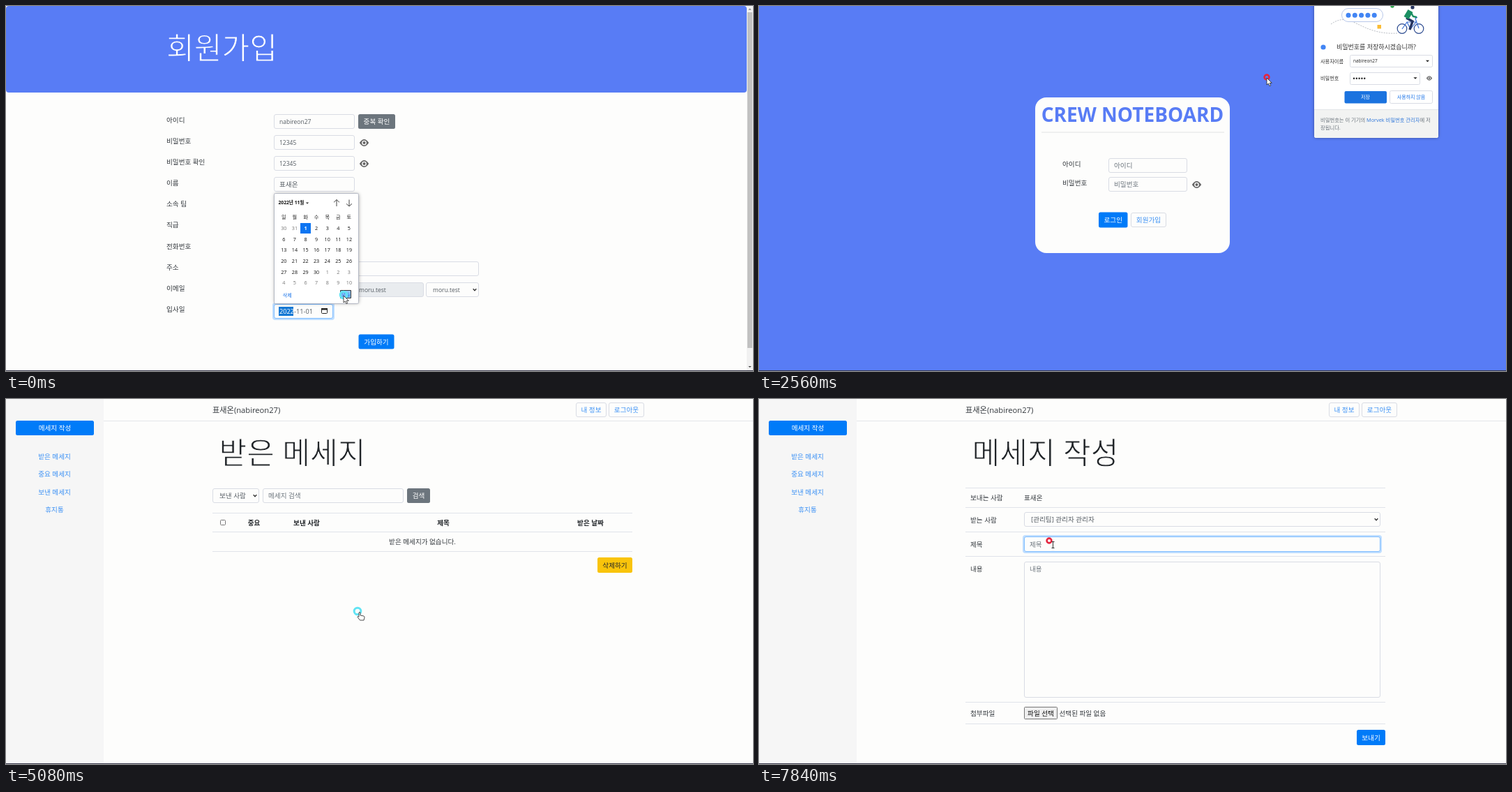
These frames come from a looping animation (1071x523 px, 8 s). An HTML page with a canvas:

```html
<!DOCTYPE html>
<html lang="ko">
<head>
<meta charset="utf-8">
<style>
html, body { margin: 0; width: 100%; height: 100%; overflow: hidden; background: #fdfdfc; }
canvas { display: block; }
</style>
</head>
<body>
<canvas id="stage" width="1071" height="523"></canvas>
<script>
const g = document.getElementById('stage').getContext('2d');
const LOOP = 8000;
const BLUE = '#587cf5', PRIMARY = '#007bf8', HOVER = '#0064cf', LINK = '#3a90f5', GREY = '#6c757d',
      INK = '#33383d', SOFT = '#555c63', PAPER = '#fdfdfc', EDGE = '#d9dce4', CHROME = '#1a73e8';
const USER = 'nabireon27', MAIL = 'nabireon', NAME = '표새온', DOMAIN = 'moru.test';

// ---- helpers ----
// y is the visual middle of the line; returns the end of the text
function text(s, x, y, size = 9.6, color = INK, align = 'left', weight = 400) {
  g.font = `${weight} ${size}px "Open Sans", "Noto Sans CJK KR", sans-serif`;
  g.textAlign = align;
  g.fillStyle = color;
  g.fillText(s, x, y + size * 0.37);
  return x + g.measureText(s).width;
}
// large thin heading: the letter edges are shaved with the background colour
function heading(s, x, y, color, back) {
  text(s, x, y, 43.2, color);
  g.strokeStyle = back;
  g.lineWidth = 1.1;
  g.lineJoin = 'round';
  g.strokeText(s, x, y + 43.2 * 0.37);
  g.lineJoin = 'miter';
}
function rect(x, y, w, h, fill, r = 0) {
  g.beginPath();
  g.roundRect(x, y, w, h, r);
  g.fillStyle = fill;
  g.fill();
}
function box(x, y, w, h, fill = PAPER, edge = EDGE, r = 2.5) {
  rect(x + .5, y + .5, w - 1, h - 1, fill, r);
  g.strokeStyle = edge;
  g.lineWidth = 1;
  g.stroke();
}
function button(s, x, y, w, h, fill = PRIMARY, color = '#fff') {
  rect(x, y, w, h, fill, 2.5);
  text(s, x + w / 2, y + h / 2, 9.6, color, 'center');
}
function ghost(s, x, y, w, h) {
  box(x, y, w, h);
  text(s, x + w / 2, y + h / 2, 9.6, LINK, 'center');
}
function glow(x, y, w, h) {
  rect(x - 2, y - 2, w + 4, h + 4, '#bfdeff', 4);
  box(x, y, w, h, PAPER, '#80bdff');
}
function field(s, x, y, w, size = 9.6, color = SOFT, fill) {
  box(x, y, w, 21, fill);
  text(s, x + 8, y + 10.5, size, color);
}
function line(points, color, width = 1) {
  g.beginPath();
  points.forEach(([x, y]) => g.lineTo(x, y));
  g.strokeStyle = color;
  g.lineWidth = width;
  g.stroke();
}
const rule = (x, y, end, color = '#e0e3ea') => rect(x, y, end - x, 1, color);
function dot(x, y, r, fill) {
  g.beginPath();
  g.arc(x, y, r, 0, 7);
  g.fillStyle = fill;
  g.fill();
}
function ring(x, y, r, color, width) {
  g.beginPath();
  g.arc(x, y, r, 0, 7);
  g.strokeStyle = color;
  g.lineWidth = width;
  g.stroke();
}
const chevron = (x, y) => line([[x - 2.3, y - 1.2], [x, y + 1.2], [x + 2.3, y - 1.2]], '#333', 1.4);
function triangle(x, y, r, dir = 1, color = '#222') {
  g.beginPath();
  g.moveTo(x - r, y - r * dir / 2);
  g.lineTo(x + r, y - r * dir / 2);
  g.lineTo(x, y + r * dir / 2);
  g.fillStyle = color;
  g.fill();
}
function select(s, x, y, w, size) {
  box(x, y, w, 21);
  text(s, x + 10, y + 10.5, size, SOFT);
  chevron(x + w - 6, y + 10.5);
}
function eye(x, y, w = 6.7) {
  g.beginPath();
  g.moveTo(x - w, y);
  g.quadraticCurveTo(x, y - w * 1.5, x + w, y);
  g.quadraticCurveTo(x, y + w * 1.5, x - w, y);
  g.fillStyle = '#666';
  g.fill();
  dot(x, y, w * .5, '#fff');
  dot(x, y, w * .3, '#666');
}

// ---- sign-up page ----
const labels = ['아이디', '비밀번호', '비밀번호 확인', '이름', '소속 팀', '직급', '전화번호', '주소', '이메일', '입사일'];

function signup(t) {
  const row = i => Math.round(155 + 30.15 * i), picking = t < 80, focus = t < 920;
  rect(0, 0, 1062, 124, BLUE, 4);
  heading('회원가입', 230, 60, '#fff', BLUE);
  labels.forEach((s, i) => text(s, 230, 163.3 + 30.12 * i));

  field(USER, 384, row(0), 116, 8.5);
  button('중복 확인', 505, row(0), 53, 21, GREY);
  for (const i of [1, 2]) {
    field('12345', 384, row(i), 116, 8.5);
    eye(513.5, row(i) + 11);
  }
  field(NAME, 384, row(3), 116);
  select('개발팀', 384, row(4), 116);
  select('사원', 384, row(5), 116);
  field('01000000000', 384, row(6), 116, 8.5);
  field('가람특별시 솔내구', 384, row(7), 294);
  field(MAIL, 384, row(8), 101, 8.5);
  text('@', 491.5, row(8) + 11, 8.5, INK, 'center');
  field(DOMAIN, 498, row(8), 101, 8.5, SOFT, '#e9ecef');
  select(DOMAIN, 602, row(8), 76, 8.5);

  if (focus) glow(384, 427, 85, 21);
  else box(384, 427, 85, 21);
  text('2022-11-01', 392, 437.5, 9.2, SOFT);
  if (focus) {
    rect(391, 431, 21, 13, '#1478d4');
    text('2022', 392, 437.5, 9.2, '#fff');
  }
  box(452, 433, 9, 8, '#fff', '#222', 1);
  rect(452, 433, 9, 2.5, '#222');

  if (t >= 960) rect(503.5, 468.5, 55, 25, '#a9d0fb', 4);
  button('가입하기', 505.5, 470.5, 51, 21, t > 620 ? HOVER : PRIMARY);

  rect(1062, 0, 9, 522, '#f1f1f1');
  rect(1063, 9, 7, 481, '#c1c1c1');
  triangle(1066.5, 4.5, 2.2, -1, '#777');
  triangle(1066.5, 517, 2.2, 1, '#444');

  if (picking) calendar();
  if (t >= 1040 && t < 1680) notice(t);
}

function calendar() {
  g.shadowColor = 'rgba(0,0,0,.35)';
  g.shadowBlur = 5;
  rect(385, 269, 121, 157, '#fff', 2);
  g.shadowBlur = 0;
  box(384, 268, 122, 159, '#fff', '#b5b9c4', 2);
  text('2022년 11월', 390.5, 282, 6.7, '#111', 'left', 700);
  triangle(432, 282.5, 2.2);
  for (const [x, d] of [[474, -1], [492, 1]]) {
    line([[x, 277.5], [x, 287]], '#444');
    line([[x - 4, 282.3 + d], [x, 282.3 + 4.7 * d], [x + 4, 282.3 + d]], '#444');
  }
  [...'일월화수목금토'].forEach((s, i) => text(s, 398.3 + 15.6 * i, 302, 7.2, '#222', 'center'));
  rect(422, 311, 15, 15, '#0d75f2');
  for (let i = 0; i < 42; i++) {
    const n = i - 1, inside = n > 0 && n < 31;
    text(n < 1 ? n + 31 : n > 30 ? n - 30 : n, 398.3 + i % 7 * 15.6, 318.5 + (i / 7 | 0) * 15.6, 7.2,
      n === 1 ? '#fff' : inside ? '#111' : '#777', 'center', n === 1 ? 700 : 400);
  }
  text('삭제', 403.3, 414, 7.2, CHROME, 'center');
  box(479, 407, 16, 12, '#8fc6f7', '#333', 0);
  text('오늘', 487, 413, 7.2, CHROME, 'center');
}

function notice(t) {
  g.shadowColor = 'rgba(0,0,0,.45)';
  g.shadowBlur = 5;
  rect(411, -6, 249, 58, '#fff', 3);
  g.shadowBlur = 0;
  text(NAME + '님, 가입을 축하드립니다.', 419, 11, 7.5, '#333');
  rect(614.5, 25, 38, 19, '#1b5fc4', 3);
  rect(615.5, 26, 36, 17, '#fff', 2);
  rect(616.5, 27, 34, 15, t > 1560 ? '#3b86ea' : CHROME, 2);
  text('확인', 633.5, 34.5, 7, '#fff', 'center', 500);
}

// ---- login page ----
function login(t) {
  const filled = t >= 3480;
  rect(0, 0, 1071, 523, BLUE);
  rect(396, 131, 279, 223, PAPER, 16);
  text('CREW NOTEBOARD', 535.5, 156, 28, BLUE, 'center', 700);
  rule(405, 180.5, 667, '#e2e3e6');
  text('아이디', 435, 226.5);
  text('비밀번호', 435, 253.5);
  if (filled) {
    field(USER, 501, 218, 113, 7.2, '#111', '#e8f0fe');
    field('', 501, 245, 113, 8, '#111', '#e8f0fe');
    for (let i = 0; i < 5; i++) dot(510.7 + 2.8 * i, 256.3, 1.15, '#111');
  } else {
    field('아이디', 501, 218, 113, 9.6, GREY);
    field('비밀번호', 501, 245, 113, 9.6, GREY);
  }
  eye(627.5, 256);
  button('로그인', 487, 295.5, 41.5, 22, t > 4440 ? HOVER : PRIMARY);
  ghost('회원가입', 533, 296, 51, 21);
  if (t >= 1960 && t < 3440) savePopup(t);
}

function savePopup(t) {
  g.shadowColor = 'rgba(0,0,0,.4)';
  g.shadowBlur = 4;
  rect(796, -10, 178, 199, '#fff', 3);
  g.shadowBlur = 0;

  g.setLineDash([2, 1.5]);
  g.beginPath();
  g.moveTo(820, 26);
  g.bezierCurveTo(850, 5, 860, 42, 915, 39);
  g.strokeStyle = '#b9bdc4';
  g.lineWidth = 1;
  g.stroke();
  g.setLineDash([]);
  box(835, 3, 60, 20, '#fff', '#b8c8ea', 10);
  for (let i = 0; i < 5; i++) dot(845 + 9.3 * i, 13.3, 3.5, '#4285f4');
  dot(908, 0, 2.7, '#34a853');
  rect(886.5, 27, 5.5, 5.5, '#fbbc34');
  for (const x of [922, 946]) ring(x, 32.5, 6.8, '#2b4a8f', 1.2);
  line([[922, 33], [929, 23], [942, 23], [934, 33], [929, 23]], '#3e72d5', 1.2);
  line([[946, 32], [941, 18], [944, 16]], '#3e72d5', 1.2);
  line([[928, 17], [937, 22], [933, 34]], '#26345f', 3.5);
  line([[928, 17], [934, 7]], '#1b8f62', 8);
  line([[934, 8], [938, 15], [943, 16]], '#1b8f62', 2.5);
  dot(937, 2, 2.6, '#26345f');

  dot(809, 59, 3.6, '#4285f4');
  text('비밀번호를 저장하시겠습니까?', 828, 59, 9, '#333');
  text('사용자이름', 805, 79, 7.2, '#333');
  box(847, 70, 119, 18, '#fff', EDGE, 2);
  text(USER, 852, 79, 6.5, '#222');
  triangle(958.5, 79, 2.6);
  text('비밀번호', 805, 103.5, 7.2, '#333');
  box(847, 95, 101, 18, '#fff', EDGE, 2);
  for (let i = 0; i < 5; i++) dot(853 + 3.8 * i, 103.7, 1.2, '#222');
  triangle(941, 103.5, 2.6);
  eye(961, 103.5, 4.2);
  rect(839.5, 122, 60.5, 17.5, t > 2980 ? '#3b86ea' : '#1b73df', 2);
  text('저장', 869.5, 130.5, 7, '#fff', 'center', 500);
  box(904, 121, 62, 19, '#fff', EDGE, 2);
  text('사용하지 않음', 935, 130.5, 7, CHROME, 'center');

  rect(796, 148, 178, 41, '#f2f3f2', [0, 0, 3, 3]);
  rule(796, 148, 974, '#e3e5e8');
  let x = text('비밀번호는 이 기기의 ', 805, 163, 7.3, GREY);
  x = text('Morvek 비밀번호 관리자', x, 163, 7.3, '#2f76d8');
  text('에 저', x, 163, 7.3, GREY);
  text('장됩니다.', 805, 174, 7.3, GREY);
}

// ---- message pages ----
function shell(title, hover) {
  rect(0, 0, 140, 523, '#f6f6f6');
  button('메세지 작성', 14, 31, 112, 21, hover ? HOVER : PRIMARY);
  ['받은 메세지', '중요 메세지', '보낸 메세지', '휴지통'].forEach((s, i) =>
    text(s, 69.5, 82 + 25.6 * i, 9.6, LINK, 'center'));
  rule(140, 31, 1071, '#e4e6ea');
  text(`${NAME}(${USER})`, 296, 16, 11.2);
  ghost('내 정보', 817, 5, 44, 21);
  ghost('로그아웃', 864, 5, 51, 21);
  heading(title, 305.5, 77, '#212529', PAPER);
}

function inbox(t) {
  shell('받은 메세지', t > 6540);
  select('보낸 사람', 296, 128, 67);
  field('메세지 검색', 368, 128, 202, 9.6, GREY);
  button('검색', 575, 128, 33, 21, GREY);
  for (const y of [163, 190, 218]) rule(296, y, 898);
  box(307, 173, 8, 8, '#fff', '#767676', 1);
  [['중요', 355.5], ['보낸 사람', 431], ['제목', 627], ['받은 날짜', 838]].forEach(([s, x]) =>
    text(s, x, 177, 9.6, '#212529', 'center', 700));
  text('받은 메세지가 없습니다.', 597, 204.5, 9.6, INK, 'center');
  button('삭제하기', 848, 227, 50, 22, '#f9c40b', '#212529');
}

function compose(t) {
  shell('메세지 작성', t < 7180);
  for (const y of [127, 155, 190, 225, 434, 465]) rule(296, y, 898);
  [['보내는 사람', 141.5], ['받는 사람', 173.5], ['제목', 208], ['내용', 243], ['첨부파일', 450]].forEach(([s, y]) =>
    text(s, 303, y));
  text(NAME, 380, 141.5);
  select('[관리팀] 관리자 관리자', 380, 162, 511);
  if (t >= 7680) glow(380, 197, 511, 22);
  else box(380, 197, 511, 22);
  text('제목', 388, 208, 9.6, GREY);
  box(380, 233, 511, 195);
  text('내용', 388, 243, 9.6, GREY);
  box(380, 441, 48, 18, '#efefef', '#767676', 1);
  text('파일 선택', 404, 450, 9.6, '#111', 'center');
  text('선택된 파일 없음', 430.5, 450);
  button('보내기', 857, 474, 41, 22);
}

// ---- pointer ----
const path = [ // time, x, y
  [0, 484, 414], [120, 484, 414], [760, 541, 463], [1280, 541, 463], [1600, 630, 33], [2080, 630, 33],
  [2560, 728, 102], [3040, 866, 128], [3440, 866, 128], [4120, 617, 247], [4560, 504, 304], [5640, 504, 304],
  [5880, 190, 165], [6160, 190, 165], [6320, 158, 149], [6640, 66, 40], [7040, 66, 40], [7600, 416, 203], [8000, 416, 203]
];
const shapes = [[0, 'arrow'], [640, 'hand'], [1300, 'arrow'], [4440, 'hand'], [5400, 'arrow'],
  [6540, 'hand'], [7180, 'arrow'], [7520, 'beam']];
const presses = [[0, 80], [920, 1040], [1600, 1700], [3320, 3440], [4960, 5240], [6760, 6900], [7640, 7740]];
const arrow = new Path2D('M0 0v10l2.3-2 1.6 3.6 1.8-.8-1.6-3.5h3.2z');
const hand = new Path2D('M0 1q1-1.4 2 0v4l5 1q1 .5 1 2l-1 4h-5.5l-3.5-4.5q0-1.5 1.2-1l.8.8z');

function pointer(t) {
  const i = path.findIndex(p => p[0] > t), [t0, x0, y0] = path[i - 1], [t1, x1, y1] = path[i];
  const u = (t - t0) / (t1 - t0), e = u * u * (3 - 2 * u);
  const x = x0 + (x1 - x0) * e, y = y0 + (y1 - y0) * e;
  const shape = shapes.filter(s => s[0] <= t).pop()[1];
  const down = presses.some(([a, b]) => t >= a && t < b);

  if (down) ring(x, y, 4.8, '#62e4f4', 3);
  else ring(x, y, 3.4, '#e5253f', 2.6);
  g.save();
  g.lineWidth = .8;
  g.strokeStyle = '#222';
  g.fillStyle = '#fff';
  if (shape === 'beam') {
    g.translate(x + 5.5, y + 6);
    line([[-2, -4.5], [2, -4.5]], '#333');
    line([[0, -4.5], [0, 4.5]], '#333');
    line([[-2, 4.5], [2, 4.5]], '#333');
  } else {
    const p = shape === 'hand' ? hand : arrow;
    g.translate(x + (shape === 'hand' ? 2 : 0), y + 1);
    g.fill(p);
    g.stroke(p);
  }
  g.restore();
}

function draw(now) {
  const t = now % LOOP;
  rect(0, 0, 1071, 523, PAPER);
  const page = t < 1720 ? signup : t < 5080 ? login : t < 6840 ? inbox : compose;
  page(t);
  rect(0, 522, 1071, 1, '#38384a');
  pointer(t);
  requestAnimationFrame(draw);
}
requestAnimationFrame(draw);
</script>
</body>
</html>
```
